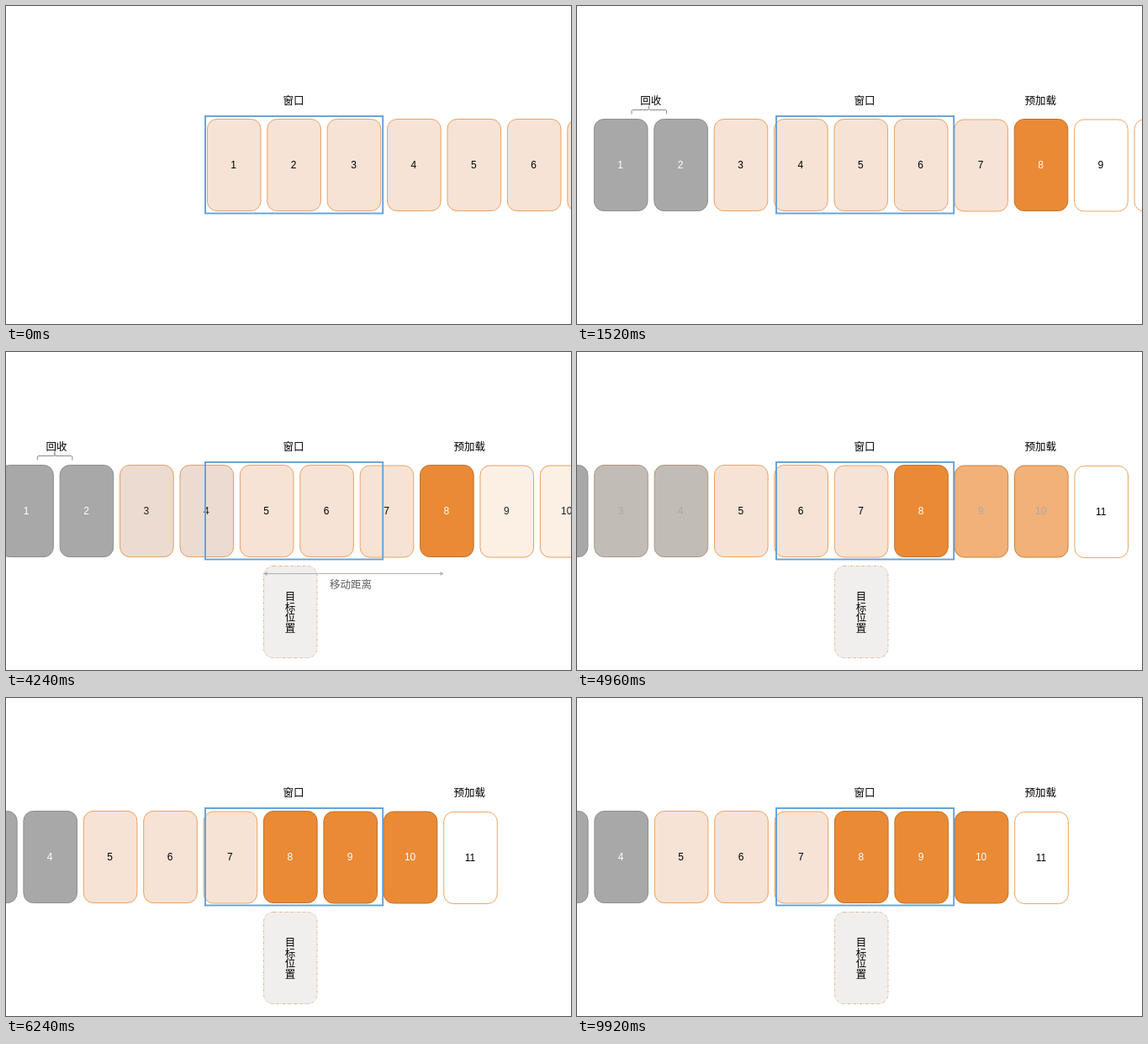
Recreate the animation shown at these times as an HTML page. Size 672 px wide and 378 px high, loop 10000 ms.

```html
<!DOCTYPE html>
<html lang="zh-CN">
<head>
<meta charset="utf-8">
<title>列表窗口</title>
<style>
  html, body { margin: 0; width: 100%; height: 100%; overflow: hidden; background: #fff; }
  svg { display: block; width: 672px; height: 378px; }
  text { font: 12.5px "Noto Sans CJK SC", "Noto Sans CJK", sans-serif; text-anchor: middle; }
  .num { font: 12px "Liberation Sans", Arial, sans-serif; }
</style>
</head>
<body>
<svg id="stage" viewBox="0 0 672 378"></svg>
<script>
const LOOP = 10000, STEP = 80;
const PITCH = 71.4, FIRST_X = 239.4;
const EASE = 'cubic-bezier(.33,.18,.47,1)';
const SLIDES = [
  { from: 0, to: 1180, x: -219 },
  { from: 3935, to: 6025, x: -432.7 }
];
const LOOKS = {
  peach:  { fill: '#f6e3d6', stroke: '#eda15e', ink: '#000' },
  gray:   { fill: '#a8a8a8', stroke: '#8e8e8e', ink: '#fff' },
  white:  { fill: '#fff',    stroke: '#eda563', ink: '#000' },
  orange: { fill: '#ea8a35', stroke: '#c2702c', ink: '#fff' }
};

const stage = document.getElementById('stage');
const anims = [];

function add(parent, tag, attrs, text) {
  const el = document.createElementNS('http://www.w3.org/2000/svg', tag);
  for (const k in attrs) el.setAttribute(k, attrs[k]);
  if (text) el.textContent = text;
  return parent.appendChild(el);
}

// steps: [from, to, value, easing]; the value holds between steps
function animate(el, prop, start, steps) {
  const frames = [{ offset: 0, [prop]: start }];
  let last = start;
  for (const [from, to, value, easing = 'linear'] of steps) {
    frames.push({ offset: from / LOOP, [prop]: last, easing });
    frames.push({ offset: to / LOOP, [prop]: value });
    last = value;
  }
  frames.push({ offset: 1, [prop]: last });
  const a = el.animate(frames, { duration: LOOP, iterations: Infinity });
  a.pause();
  anims.push(a);
}

const slideBy = (el, slides, shift = 0) => animate(el, 'transform', 'translateX(0px)',
  slides.map(s => [s.from, s.to, `translateX(${s.x - shift}px)`, EASE]));

function morph(el, prop, a, b, s) {
  animate(el, prop, a, [[s.from, s.to, b, EASE]]);
}

function addCard(row, n) {
  const before = LOOKS[n < 8 ? 'peach' : 'white'];
  const after = LOOKS[n < 5 ? 'gray' : 'orange'];
  const x = FIRST_X + (n - 1) * PITCH;
  const y = n < 7 || n === 8 ? 134.5 : n === 11 ? 135.5 : 135;
  const box = add(row, 'rect', { x, y, width: 63.6, height: 109, rx: 11.5,
    fill: before.fill, stroke: before.stroke });
  const num = add(row, 'text', { class: 'num', x: x + 31.3, y: n === 11 ? 194 : 193.4,
    fill: before.ink }, String(n));
  const turn = [1, 2, 8].includes(n) ? SLIDES[0] : [3, 4, 9, 10].includes(n) ? SLIDES[1] : null;
  if (!turn) return;
  morph(box, 'fill', before.fill, after.fill, turn);
  morph(box, 'stroke', before.stroke, after.stroke, turn);
  morph(num, 'fill', before.ink, after.ink, turn);
}

// target slot
const slot = add(stage, 'g');
add(slot, 'rect', { x: 306.5, y: 254.5, width: 63.5, height: 109, rx: 11.5, fill: '#f0efee',
  stroke: '#dfb595', 'stroke-dasharray': '3 1.5 1 1.5' });
[...'目标位置'].forEach((c, i) => add(slot, 'text', { x: 338, y: 295 + i * 12.7 }, c));
animate(slot, 'opacity', 0, [[2040, 2740, 1]]);

// cards
const row = add(stage, 'g');
for (let n = 1; n <= 11; n++) addCard(row, n);
slideBy(row, SLIDES);

// recycle label with brace
const recycle = add(stage, 'g');
add(recycle, 'text', { x: 87.7, y: 116.8 }, '回收');
add(recycle, 'path', { fill: 'none', stroke: '#8c8c8c',
  d: 'M65 128.5V125Q65 123.5 66.5 123.5H84.5Q85.5 123.5 85.5 122V118.5V122Q85.5 123.5 86.5 123.5H105Q106.5 123.5 106.5 125V128.5' });
animate(recycle, 'opacity', 0, [[0, 1180, 1]]);
slideBy(recycle, [SLIDES[1]], SLIDES[0].x);

// preload label
const preload = add(stage, 'text', { x: 551.3, y: 116.8 }, '预加载');
animate(preload, 'opacity', 0, [[0, 1180, 1]]);

// window frame
add(stage, 'text', { x: 342, y: 116.8 }, '窗口');
add(stage, 'rect', { x: 237, y: 131, width: 211.2, height: 115.5, fill: 'none',
  stroke: '#62a1da', 'stroke-width': 1.9 });

// distance arrow
const span = add(stage, 'g');
add(span, 'path', { d: 'M308 263.5H519', stroke: '#858b91' });
add(span, 'path', { d: 'M306.5 263.5l4-2.5v5zM520.5 263.5l-4-2.5v5z', fill: '#858b91' });
add(span, 'text', { x: 410, y: 281 }, '移动距离');
animate(span, 'opacity', 0, [[3150, 3850, 1], [SLIDES[1].from, 4785, 0]]);

const t0 = performance.now();
function tick() {
  const t = Math.floor((performance.now() - t0) % LOOP / STEP) * STEP;
  for (const a of anims) a.currentTime = t;
  requestAnimationFrame(tick);
}
tick();
</script>
</body>
</html>
```
